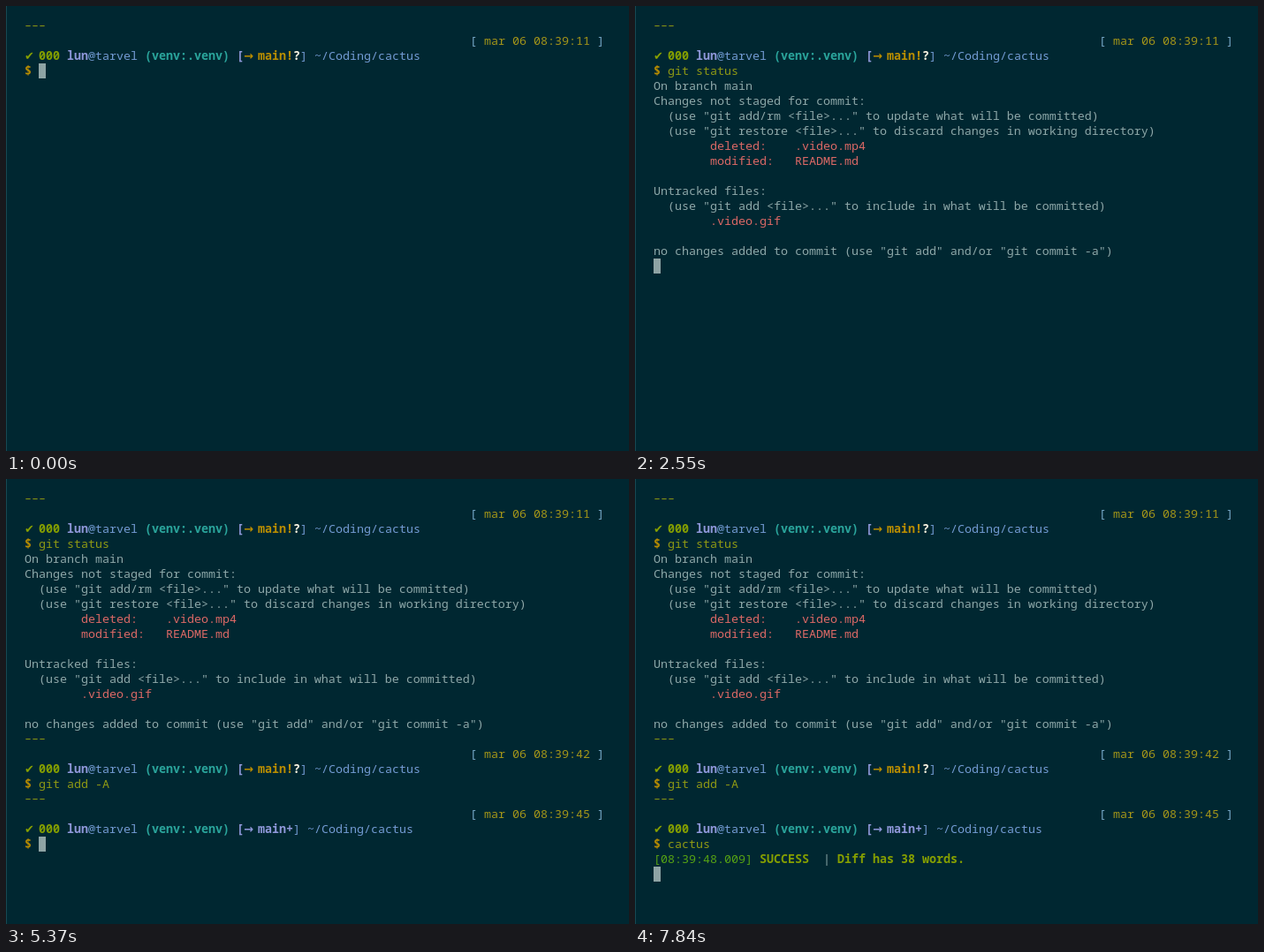
Write an HTML page with a canvas that moves like this. It is 705 by 504 pixels and loops after 8 s.

```html
<!DOCTYPE html>
<html lang="en">
<head>
<meta charset="utf-8">
<title>Terminal session</title>
<style>
html, body { margin: 0; width: 100%; height: 100%; overflow: hidden; background: #002731; }
canvas { display: block; }
</style>
</head>
<body>
<canvas id="screen" width="705" height="504"></canvas>
<script>
const ctx = document.getElementById('screen').getContext('2d');
const LOOP = 8000, CELL_W = 8, CELL_H = 17, LEFT = 21, TOP = 14;
const REGULAR = '13.333px "Noto Sans Mono", "DejaVu Sans Mono", monospace';
const BOLD = 'bold ' + REGULAR;
const SYMBOL = 'bold 13px "DejaVu Sans", sans-serif';
const C = {
  bg: '#002731', edge: '#164852', text: '#8ea8a9', cursor: '#8ea3a4',
  olive: '#8f9a14', date: '#a39519', yellow: '#ba8e00', green: '#859f00',
  lime: '#55a314', teal: '#2aa59c', blue: '#739cd4', violet: '#8f98da',
  red: '#dd6966', white: '#fdf6e3', bracket: '#78a9c8'
};

function put(row, col, text, color = C.text, font = REGULAR) {
  ctx.font = font;
  ctx.fillStyle = color;
  ctx.fillText(text, LEFT + col * CELL_W, TOP + row * CELL_H + 13);
}

function drawPrompt({ row, clock, staged }) {
  put(row - 1 / CELL_H, 0, '–––', C.olive);
  put(row + 1, 63, '[', C.bracket);
  put(row + 1, 65, 'mar 06 ' + clock, C.date);
  put(row + 1, 81, ']', C.bracket);

  const r = row + 2, end = staged ? 38 : 39;
  const branch = staged ? C.violet : C.yellow;
  put(r, 0, '✔', C.green, SYMBOL);
  put(r, 2, '000', C.green, BOLD);
  put(r, 6, 'lun', C.violet, BOLD);
  put(r, 9, '@tarvel', C.blue);
  put(r, 17, '(venv:.venv)', C.teal, BOLD);
  put(r, 30, '[', C.violet, BOLD);
  put(r, 31, '→', branch, SYMBOL);
  put(r, 33, staged ? 'main+' : 'main!', branch, BOLD);
  if (!staged) put(r, 38, '?', C.white, BOLD);
  put(r, end, ']', C.blue);
  put(r, end + 2, '~/Coding/cactus', C.blue);
  put(row + 3, 0, '$', C.yellow, BOLD);
}

function drawStatus() {
  [
    'On branch main',
    'Changes not staged for commit:',
    '  (use "git add/rm <file>..." to update what will be committed)',
    '  (use "git restore <file>..." to discard changes in working directory)',
    '', '', '',
    'Untracked files:',
    '  (use "git add <file>..." to include in what will be committed)',
    '', '',
    'no changes added to commit (use "git add" and/or "git commit -a")'
  ].forEach((line, i) => put(4 + i, 0, line));
  put(8, 8, 'deleted:    .video.mp4', C.red);
  put(9, 8, 'modified:   README.md', C.red);
  put(13, 8, '.video.gif', C.red);
}

function drawResult() {
  put(24, 0, '[08:39:48.009]', C.lime);
  put(24, 15, 'SUCCESS', C.green, BOLD);
  put(24, 24, '|', C.text);
  put(24, 26, 'Diff has 38 words.', C.green, BOLD);
}

// Each key time reveals one more character of the command.
const sessions = [
  { at: 0, row: 0, clock: '08:39:11', command: 'git status', enter: 2550, cursorRow: 16,
    keys: [1470, 1650, 1740, 2010, 2010, 2100, 2190, 2280, 2370, 2460] },
  { at: 2730, row: 16, clock: '08:39:42', command: 'git add -A', enter: 5100, cursorRow: 20,
    keys: [3370, 3740, 3830, 4010, 4100, 4190, 4280, 4460, 4550, 4640] },
  { at: 5370, row: 20, clock: '08:39:45', staged: true, command: 'cactus', enter: 7570, cursorRow: 24,
    keys: [6940, 7030, 7120, 7210, 7300, 7480] }
];

function draw(t) {
  ctx.fillStyle = C.bg;
  ctx.fillRect(0, 0, 705, 504);
  ctx.fillStyle = C.edge;
  ctx.fillRect(0, 0, 1, 504);

  let cursor;
  for (const s of sessions) {
    if (t < s.at) break;
    const typed = s.keys.filter(k => k <= t).length;
    drawPrompt(s);
    put(s.row + 3, 2, s.command.slice(0, typed), C.olive);
    cursor = t < s.enter ? [s.row + 3, 2 + typed] : [s.cursorRow, 0];
  }
  if (t >= 2550) drawStatus();
  if (t >= 7840) {
    drawResult();
    cursor = [25, 0];
  }
  ctx.fillStyle = C.cursor;
  ctx.fillRect(LEFT + cursor[1] * CELL_W, TOP + cursor[0] * CELL_H, CELL_W, CELL_H);
}

const start = performance.now();
function tick() {
  draw((performance.now() - start) % LOOP);
  requestAnimationFrame(tick);
}
tick();
</script>
</body>
</html>
```
